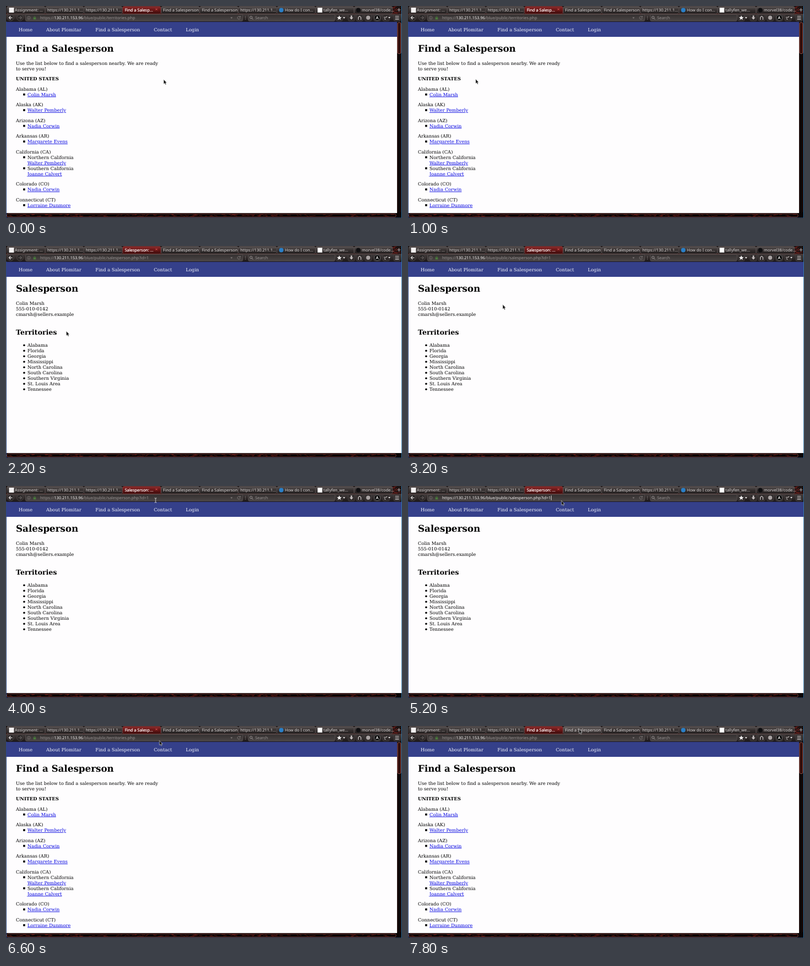
These frames come from a looping animation (720 by 385 pixels, 8 s). An HTML page:

```html
<!DOCTYPE html>
<html lang="en">
<head>
<meta charset="utf-8">
<title>Find a Salesperson</title>
<style>
  html, body { margin: 0; width: 100%; height: 100%; overflow: hidden; background: #000; }
  svg { display: block; width: 720px; height: 385px; }
  text { text-rendering: geometricPrecision; white-space: pre; }
  .page text { font: 8.36px "DejaVu Serif", serif; fill: #000; }
  .page .nav { fill: #f4f5fc; }
  .page .bold { font-weight: bold; }
  .page .h1 { font-size: 16.76px; font-weight: bold; }
  .page .h2 { font-size: 12.55px; font-weight: bold; }
  .page .link { fill: #0000e0; text-decoration: underline; }
  .ui text { font: 7.4px "Noto Sans", sans-serif; fill: #dedbdb; }
  .ui .active { fill: #fff; stroke: #fff; stroke-width: .2; }
  .ui .dim { fill: #969292; }
  .ui .lit { fill: #f2f0f0; }
</style>
</head>
<body>
<svg id="stage" viewBox="0 0 720 385" xmlns="http://www.w3.org/2000/svg">
  <defs>
    <linearGradient id="tab" x2="0" y2="1">
      <stop offset="0" stop-color="#5a5454"/><stop offset=".5" stop-color="#353030"/><stop offset="1" stop-color="#211d1d"/>
    </linearGradient>
    <linearGradient id="hoverTab" x2="0" y2="1">
      <stop offset="0" stop-color="#6a6464"/><stop offset=".5" stop-color="#464040"/><stop offset="1" stop-color="#2e2929"/>
    </linearGradient>
    <linearGradient id="activeTab" x2="0" y2="1">
      <stop offset="0" stop-color="#8b2b2b"/><stop offset=".5" stop-color="#681616"/><stop offset="1" stop-color="#390b0b"/>
    </linearGradient>
    <linearGradient id="toolbar" x2="0" y2="1">
      <stop offset="0" stop-color="#443e3e"/><stop offset="1" stop-color="#1d1818"/>
    </linearGradient>
    <linearGradient id="field" x2="0" y2="1">
      <stop offset="0" stop-color="#343030"/><stop offset="1" stop-color="#4b4646"/>
    </linearGradient>
    <linearGradient id="thumb">
      <stop offset="0" stop-color="#5a1914"/><stop offset=".5" stop-color="#1c0504"/><stop offset="1" stop-color="#61201a"/>
    </linearGradient>
  </defs>
</svg>
<script>
const LOOP = 8000, STEP = 200;
const stage = document.getElementById('stage');

function add(parent, tag, attrs = {}, text) {
  const el = document.createElementNS(stage.namespaceURI, tag);
  for (const key in attrs) el.setAttribute(key, attrs[key]);
  if (text !== undefined) el.textContent = text;
  parent.append(el);
  return el;
}
const group = (parent, cls = '') => add(parent, 'g', { class: cls });
const rect = (parent, x, y, width, height, fill, more) =>
  add(parent, 'rect', { x, y, width, height, fill, ...more });
const dot = (parent, cx, cy, r, fill, more) => add(parent, 'circle', { cx, cy, r, fill, ...more });
const line = (parent, d, stroke, width = 1, more) =>
  add(parent, 'path', { d, stroke, 'stroke-width': width, fill: 'none', ...more });
const label = (parent, x, y, text, cls = '') => add(parent, 'text', { x, y, class: cls }, text);
const show = (el, on) => el.setAttribute('visibility', on ? 'inherit' : 'hidden');

// Dark red scratches over black
function scratches(parent, x, y, w, h, count, seed) {
  const rand = () => (seed = (seed * 16807) % 2147483647) / 2147483647;
  let d = '';
  for (let i = 0; i < count; i++) {
    const sx = x + rand() * (w - 8), sy = y + rand() * h;
    const ex = sx + 3 + rand() * 5, ey = Math.min(y + h, Math.max(y, sy + rand() * 4 - 2));
    d += `M${sx.toFixed(1)} ${sy.toFixed(1)}L${ex.toFixed(1)} ${ey.toFixed(1)}`;
  }
  line(parent, d, '#7c211b', .8, { opacity: .75 });
}

// Page content
rect(stage, 0, 0, 720, 385, '#080505');
rect(stage, 1, 29, 718, 347, '#fefdfe');
rect(stage, 1, 28.5, 718, 27.5, '#35408a');
const page = group(stage, 'page');
[[23, 'Home'], [73, 'About Plomitar'], [162.6, 'Find a Salesperson'], [268.7, 'Contact'], [327, 'Login']]
  .forEach(([x, text]) => label(page, x, 46.4, text, 'nav'));

const listPage = group(page);
label(listPage, 18, 83, 'Find a Salesperson', 'h1');
label(listPage, 18, 106.8, 'Use the list below to find a salesperson nearby. We are ready');
label(listPage, 18, 116.7, 'to serve you!');
label(listPage, 18, 135.1, 'UNITED STATES', 'bold');
const square = y => rect(listPage, 31.2, y - 4.7, 3.6, 3.6, '#000');
[
  [153.6, 'Alabama (AL)', 'Colin Marsh'],
  [182, 'Alaska (AK)', 'Walter Pemberly'],
  [210.6, 'Arizona (AZ)', 'Nadia Corwin'],
  [239, 'Arkansas (AR)', 'Margarete Evens'],
  [326, 'Colorado (CO)', 'Nadia Corwin'],
  [354.6, 'Connecticut (CT)', 'Lorraine Dunmore']
].forEach(([y, state, person]) => {
  label(listPage, 18, y, state);
  square(y + 10);
  label(listPage, 39, y + 10, person, 'link');
});
label(listPage, 18, 267.6, 'California (CA)');
[[277.6, 'Northern California', 'Walter Pemberly'], [297.6, 'Southern California', 'Joanne Calvert']]
  .forEach(([y, region, person]) => {
    square(y);
    label(listPage, 39, y, region);
    label(listPage, 39, y + 10, person, 'link');
  });
rect(listPage, 711, 28.5, 8, 348, '#0b0707');
line(listPage, 'M712.3 88V374M717.6 88V374', '#3a1512', .7);
rect(listPage, 711.9, 30, 6, 56.5, 'url(#thumb)', { rx: 2, stroke: '#a5675f', 'stroke-width': .8 });

const personPage = group(page);
label(personPage, 18, 83, 'Salesperson', 'h1');
['Colin Marsh', '555-010-0142', 'cmarsh@sellers.example']
  .forEach((text, i) => label(personPage, 18, 106.8 + i * 9.95, text));
label(personPage, 18, 161.2, 'Territories', 'h2');
['Alabama', 'Florida', 'Georgia', 'Mississippi', 'North Carolina', 'South Carolina',
  'Southern Virginia', 'St. Louis Area', 'Tennessee'].forEach((text, i) => {
  const y = 183.2 + i * 10;
  dot(personPage, 33, y - 2.9, 1.8, '#000');
  label(personPage, 39, y, text);
});

// Window frame
const ui = group(stage, 'ui');
rect(ui, 0, 0, 720, 28.5, '#1a1313');
scratches(ui, 700, 0, 20, 14, 20, 17);
rect(ui, 0, 14.4, 720, 13.6, 'url(#toolbar)');
line(ui, 'M0 14.5H720', '#6e2a26', .6);
rect(ui, 0, 376, 720, 9, '#0a0505');
scratches(ui, 2, 378.6, 706, 3.6, 130, 29);
rect(ui, 1.5, 377.6, 707.5, 5.6, 'none', { rx: 2, stroke: '#8f4a43', 'stroke-width': .8 });
rect(ui, 0, 28, 1, 357, '#2c4a82');
rect(ui, 719, 0, 1, 385, '#3478a8');
rect(ui, 0, 384.2, 720, .8, '#2c4a6e');

// Tabs
const tabs = [
  [16, 'Assignment: ...'], [75, 'https://130.211.1...'], [145, 'https://130.211.1...'], [216, ''],
  [285.5, 'Find a Salesperson'], [356, 'Find a Salesperson'], [426, 'https://130.211.1...'],
  [507, 'How do I con...'], [577, 'tallyfen_we...'], [647, 'morvel38/code...']
].map(([x, text], i) => {
  const active = i === 3;
  const back = rect(ui, 1.5 + i * 70.2, .8, 69.4, 13.4, active ? 'url(#activeTab)' : 'url(#tab)',
    { rx: 2.5, stroke: active ? '#8e4a48' : '#6b6464', 'stroke-width': .6 });
  return { back, title: label(ui, x, 10.4, text, active ? 'active' : '') };
});
const activeTitle = tabs[3].title;
rect(ui, 5.5, 3, 9, 9, '#f4f2f2');
dot(ui, 500.5, 7.5, 4, '#2a80c8');
rect(ui, 566.5, 3.2, 8.6, 8.6, '#fff');
dot(ui, 640.5, 7.5, 4, '#0e0e10');
line(ui, 'M272 4.5l3 3m0-3l-3 3', '#e05a58', 1);
line(ui, 'M711.5 7h6M714.5 4v6', '#a39d9d', 1.2);
const spinner = group(ui);
dot(spinner, 220.5, 7.5, 3.3, '#a41414', { stroke: '#f3b5b0', 'stroke-width': 1.2 });

// Toolbar
for (const x of [8.5, 25.5]) dot(ui, x, 21.3, 5.7, '#2a2727', { stroke: '#5b5454', 'stroke-width': .7 });
line(ui, 'M8.4 18.3l-3 3 3 3M5.6 21.3H11.5', '#d4d0d0', 1.3);
line(ui, 'M25.6 18.3l3 3-3 3M28.4 21.3H22.5', '#5d5757', 1.3);
rect(ui, 35.5, 15.4, 395, 11.9, 'url(#field)', { rx: 2, stroke: '#655e5e', 'stroke-width': .6 });
rect(ui, 440.5, 15.4, 157.5, 11.9, 'url(#field)', { rx: 2, stroke: '#655e5e', 'stroke-width': .6 });
const secure = group(ui);
dot(secure, 41.5, 21.4, 2.8, 'none', { stroke: '#837d7d', 'stroke-width': .7 });
line(secure, 'M41.5 20.8v2.2M41.5 19.4v.7', '#837d7d', .8);
rect(secure, 49.8, 20.8, 4.6, 3.6, '#4a7a3c');
line(secure, 'M50.8 21v-1.4q1.3-2 2.6 0v1.4', '#4a7a3c', .8);
const pending = group(ui);
dot(pending, 44.5, 21.4, 2.8, 'none', { stroke: '#6d6767', 'stroke-width': .7 });
const url = label(ui, 62, 24.1, '');
const [scheme, host, path] = ['dim', 'lit', 'dim'].map(cls => add(url, 'tspan', { class: cls }));
scheme.textContent = 'https://';
host.textContent = '130.211.153.96';
const caret = rect(ui, 0, 17.3, .8, 8.4, '#f4f4f4');
add(ui, 'path', { d: 'M408 20.4h4l-2 2.6z', fill: '#827c7c' });
const reload = group(ui);
line(reload, 'M425.7 20a2.6 2.6 0 1 0 .3 2M426.2 18v2.2h-2.2', '#827c7c', .9);
const stop = group(ui);
line(stop, 'M421.2 19.2l4.4 4.4m0-4.4l-4.4 4.4', '#9a9494', 1.1);
for (const y of [19, 21.5, 24]) dot(ui, 435.3, y, .6, '#b3adad');
dot(ui, 445.5, 20.6, 2.1, 'none', { stroke: '#a39d9d', 'stroke-width': .9 });
line(ui, 'M447 22.2l2.2 2.4', '#a39d9d', 1);
label(ui, 453, 24.1, 'Search', 'dim');

const icon = '#f1efef';
for (const x of [606, 628, 643, 658.5, 675, 691, 711])
  rect(ui, x - 6, 15.6, 12, 11.6, '#312c2c', { rx: 2, stroke: '#5b5454', 'stroke-width': .5 });
add(ui, 'path', { d: 'M606 17l1.3 2.9 3.1.3-2.4 2 .8 3.1-2.8-1.7-2.8 1.7.8-3.1-2.4-2 3.1-.3z', fill: icon });
add(ui, 'path', { d: 'M612.7 20.3h4l-2 2.6zM695 20h4l-2 2.5z', fill: icon });
add(ui, 'path', { d: 'M626.7 17.3h2.6v3.5h2.2l-3.5 4-3.5-4h2.2z', fill: '#c5c0c0' });
line(ui, 'M640.6 25v-4.5l2.4-2 2.4 2V25', '#c5c0c0', 1.3);
dot(ui, 658.5, 21.3, 3.7, '#aaa4a4');
dot(ui, 675, 21.4, 5.2, '#050505', { stroke: '#999', 'stroke-width': .6 });
label(ui, 672.5, 24.4, 'A', 'active');
line(ui, 'M687 20.5h4l2-1.5M688 22.5l2 2', '#c5c0c0', 1.2);
line(ui, 'M707.5 18.5h7M707.5 21.3h7M707.5 24.1h7', '#d4d0d0', 1.1);

const status = group(ui);
add(status, 'path', { d: 'M0 373H167.5q3.5 0 3.5 3.5V385H0z', fill: '#050303' });
label(status, 3, 381.3, 'Waiting for 130.211.153.96...', 'lit');

// Pointers, both drawn around the hot spot
const arrow = add(stage, 'path', {
  d: 'M0 0V8.2L1.8 6.6 3.1 9.4 4.6 8.7 3.3 6H5.7Z',
  fill: '#101010', stroke: '#e8e8e8', 'stroke-width': .6
});
const beam = line(stage, 'M-2-4.2Q0-4.2 0-3V3Q0 4.2-2 4.2M2-4.2Q0-4.2 0-3M0 3Q0 4.2 2 4.2', '#d9d9d9', .9);

// [time, x, y]
const pointerPath = [
  [0, 286.7, 133.5], [200, 280, 134], [1000, 123, 132.7], [1400, 76, 159], [1800, 76, 159],
  [2200, 109.7, 154.7], [2800, 118, 150], [3800, 272, 26], [4600, 272, 26],
  [5000, 279, 26.5], [6800, 279, 26.5], [7600, 311, 5.5], [8000, 311, 5.5]
];
function pointerAt(t) {
  const i = pointerPath.findIndex(p => p[0] > t);
  const [t0, x0, y0] = pointerPath[i - 1], [t1, x1, y1] = pointerPath[i];
  const u = (t - t0) / (t1 - t0), k = u * u * (3 - 2 * u);
  return [x0 + (x1 - x0) * k, y0 + (y1 - y0) * k];
}

// Browser states: start time, tab title, path, flags
const LIST = '/blue/public/territories.php', PERSON = '/blue/public/salesperson.php?id=1';
const states = [
  { from: 0, title: 'Find a Salesp...', path: LIST, list: true },
  { from: 1800, title: 'Salesperson: ...', path: PERSON },
  { from: 4400, title: 'Salesperson: ...', path: PERSON, focus: true },
  { from: 5400, title: 'Salesperson: ...', path: PERSON + '0', focus: true },
  { from: 5600, title: 'Connectin...', path: PERSON + '0', loading: true },
  { from: 6200, title: 'Find a Salesp...', path: LIST, list: true }
];
let current;
function apply(state) {
  current = state;
  const loading = !!state.loading;
  show(listPage, state.list);
  show(personPage, !state.list);
  activeTitle.textContent = state.title;
  activeTitle.setAttribute('x', loading ? 227 : 216);
  path.textContent = state.path;
  for (const part of [scheme, path]) part.setAttribute('class', state.focus ? 'lit' : 'dim');
  url.setAttribute('x', loading ? 52 : 62);
  show(caret, state.focus);
  caret.setAttribute('x', 62.4 + url.getComputedTextLength());
  for (const el of [spinner, pending, stop, status]) show(el, loading);
  for (const el of [secure, reload]) show(el, !loading);
}

function draw(now) {
  const t = Math.floor((now % LOOP) / STEP) * STEP;
  const state = states.findLast(s => s.from <= t);
  if (state !== current) apply(state);
  const [x, y] = pointerAt(t);
  const overField = t >= 3600 && t < 4800 && y < 29;
  show(arrow, !overField);
  show(beam, overField);
  arrow.setAttribute('transform', `translate(${x} ${y})`);
  beam.setAttribute('transform', `translate(${x} ${y})`);
  tabs[4].back.setAttribute('fill', y < 14 ? 'url(#hoverTab)' : 'url(#tab)');
  requestAnimationFrame(() => draw(performance.now() - start));
}
const start = performance.now();
draw(0);
</script>
</body>
</html>
```
